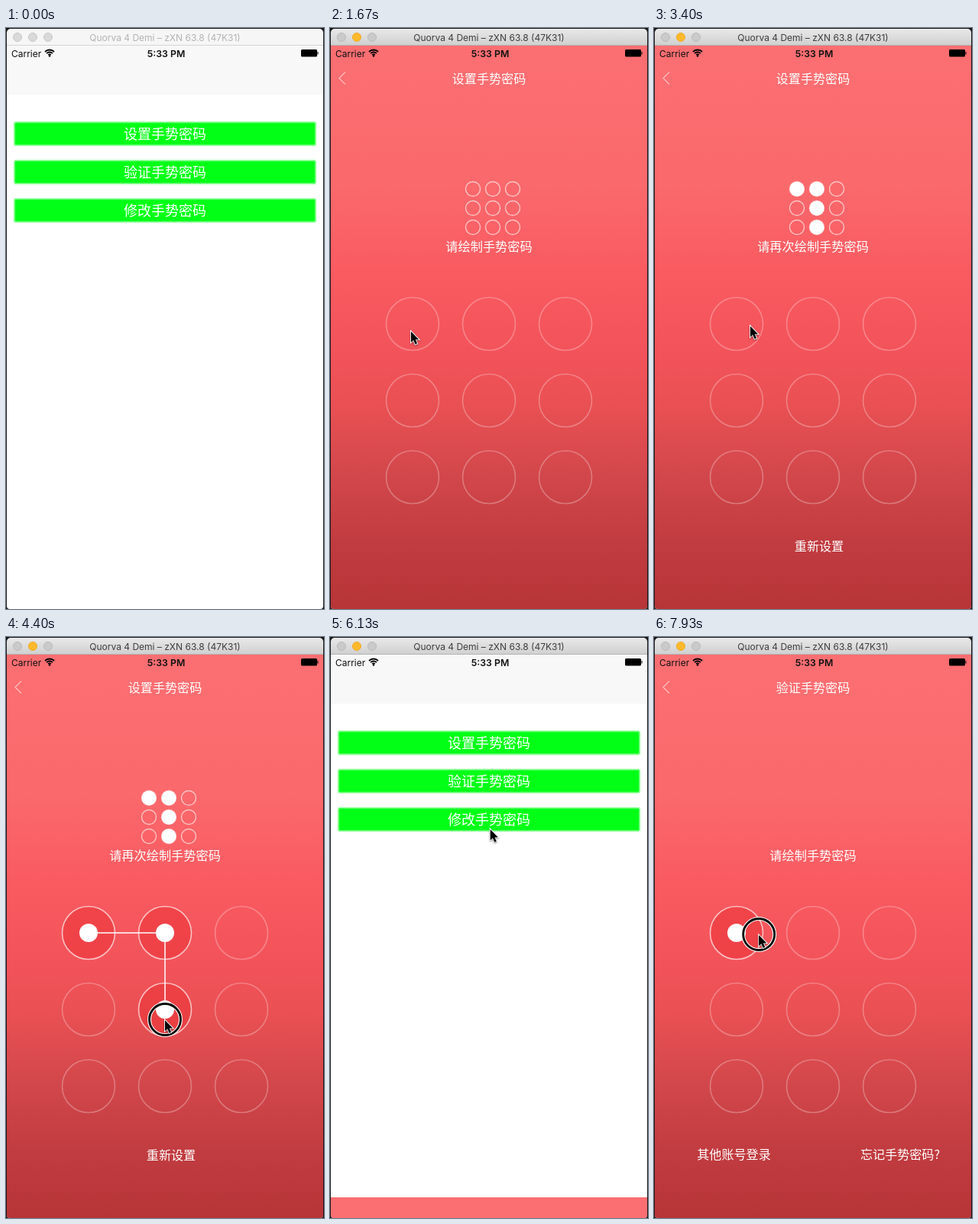
An HTML page with a canvas that plays this animation: 416 px wide and 758 px high, repeating every 8000 ms.

```html
<!DOCTYPE html>
<html lang="zh">
<head>
<meta charset="utf-8">
<style>
  html, body { margin: 0; overflow: hidden; background: #171717; }
  canvas { display: block; }
</style>
</head>
<body>
<canvas id="stage" width="416" height="758"></canvas>
<script>
const ctx = document.getElementById('stage').getContext('2d');
const LOOP = 8000, SCREEN_TOP = 22, SCREEN_HEIGHT = 736;
const SET_OPENS = 1037, SET_CLOSES = 5850, VERIFY_OPENS = 6706;
const CJK = '"Noto Sans CJK SC", "Noto Sans CJK", sans-serif';
const LATIN = 'Inter, Roboto, sans-serif';
const PATTERN = [0, 1, 4, 7];

// Pointer stops: time, x, y
const pointerStops = [
  [70, 300, 545], [650, 221, 145], [1130, 221, 145], [1670, 106, 395],
  [1800, 108, 390], [2150, 208, 388], [2500, 208, 486], [2850, 208, 588],
  [2950, 208, 588], [3400, 126, 388], [3560, 114, 387], [3950, 208, 388],
  [4350, 208, 486], [4750, 208, 588], [4900, 208, 588], [5670, 225, 363],
  [6450, 201, 185], [7000, 201, 185], [7750, 118, 389], [7870, 120, 389],
  [7930, 137, 388], [8000, 150, 388]
];
const drags = [
  { start: 1800, end: 2900, hits: [1800, 2030, 2390, 2740] },
  { start: 3560, end: 4850, hits: [3560, 3815, 4225, 4615] },
  { start: 7860, end: LOOP, hits: [7860] }
];
const clicks = [{ start: 850, end: 990 }, { start: 6560, end: 6690 }];

const during = (t, span) => t >= span.start && t < span.end;

// Critically damped spring: the share of the way still to go
function springLeft(ms) {
  const x = Math.max(0, ms) * 0.01826;
  return (1 + x) * Math.exp(-x);
}

function pointerAt(t) {
  const i = pointerStops.findIndex(stop => stop[0] > t);
  const [t0, x0, y0] = pointerStops[i - 1], [t1, x1, y1] = pointerStops[i];
  let k = (t - t0) / (t1 - t0);
  if (!drags.some(drag => during(t, drag))) k = k * k * (3 - 2 * k);
  return { x: x0 + (x1 - x0) * k, y: y0 + (y1 - y0) * k };
}

function text(value, x, y, size, color = '#fff', { family = CJK, weight = 400, align = 'center' } = {}) {
  ctx.font = `${weight} ${size}px ${family}`;
  ctx.textAlign = align;
  ctx.textBaseline = 'alphabetic';
  ctx.fillStyle = color;
  ctx.fillText(value, x, y);
}

function circle(x, y, r, { fill, stroke, width = 1 }) {
  ctx.beginPath();
  ctx.arc(x, y, r, 0, Math.PI * 2);
  if (fill) { ctx.fillStyle = fill; ctx.fill(); }
  if (stroke) { ctx.strokeStyle = stroke; ctx.lineWidth = width; ctx.stroke(); }
}

function polyline(points, color, width) {
  ctx.beginPath();
  points.forEach(([x, y]) => ctx.lineTo(x, y));
  ctx.strokeStyle = color;
  ctx.lineWidth = width;
  ctx.stroke();
}

function verticalGradient(top, bottom, stops) {
  const gradient = ctx.createLinearGradient(0, top, 0, bottom);
  stops.forEach(([at, color]) => gradient.addColorStop(at, color));
  return gradient;
}

function drawTitleBar(active) {
  ctx.fillStyle = active ? verticalGradient(1, 22, [[0, '#e9e9e9'], [1, '#d0d0d0']]) : '#f6f6f6';
  ctx.fillRect(0, 0, 416, 22);
  ctx.fillStyle = active ? '#b4b4b4' : '#d5d5d5';
  ctx.fillRect(0, 22, 416, 1);
  [15, 35, 55].forEach((x, i) => {
    const lit = active && i === 1;
    circle(x, 12, 5.5, {
      fill: lit ? '#fdb92c' : active ? '#cacaca' : '#d9d9d9',
      stroke: lit ? '#eeaa28' : active ? '#b8b8b8' : '#c6c6c6'
    });
  });
  text('Quorva 4 Demi – zXN 63.8 (47K31)', 208, 17, 12, active ? '#3d3d3d' : '#b3b3b3', { family: LATIN });
}

function drawStatusBar() {
  text('Carrier', 7, 38, 12, '#111', { family: LATIN, align: 'left' });
  text('5:33 PM', 209.5, 38, 12.3, '#111', { family: LATIN, weight: 600 });
  [2.5, 5.5, 8.5].forEach(r => {
    ctx.beginPath();
    ctx.arc(57, 37, r, -Math.PI * 0.75, -Math.PI * 0.25);
    ctx.strokeStyle = '#000';
    ctx.lineWidth = 1.8;
    ctx.stroke();
  });
  circle(57, 36.5, 1.2, { fill: '#000' });
  ctx.fillStyle = '#000';
  ctx.beginPath();
  ctx.roundRect(386, 28, 21, 9.5, 1.5);
  ctx.fill();
  ctx.fillRect(407.5, 31, 1, 3.5);
}

function drawMenu() {
  ctx.fillStyle = '#fff';
  ctx.fillRect(0, SCREEN_TOP, 416, SCREEN_HEIGHT);
  ctx.fillStyle = '#f8f8f8';
  ctx.fillRect(0, SCREEN_TOP, 416, 65);
  ['设置手势密码', '验证手势密码', '修改手势密码'].forEach((label, i) => {
    const y = 123 + i * 50;
    ctx.save();
    ctx.filter = 'blur(0.8px)';
    ctx.fillStyle = '#02ff16';
    ctx.fillRect(11, y, 394, 30);
    ctx.restore();
    text(label, 208, y + 21.5, 18);
  });
}

const nodeCenter = i => [108 + i % 3 * 100, 386 + Math.floor(i / 3) * 100];

function drawPad(t, offset) {
  const drag = drags.find(d => during(t, d));
  const chosen = drag ? PATTERN.filter((_, i) => t >= drag.hits[i]) : [];
  for (let i = 0; i < 9; i++) {
    const [x, y] = nodeCenter(i), on = chosen.includes(i);
    circle(x, y, 34.5, {
      fill: on ? 'rgba(236,48,52,.5)' : null,
      stroke: `rgba(255,255,255,${on ? 0.65 : 0.28})`, width: 1.6
    });
    if (on) circle(x, y, 12, { fill: '#fff' });
  }
  if (chosen.length) {
    const points = chosen.map(nodeCenter);
    const finger = pointerAt(t), [x, y] = points[points.length - 1];
    if (Math.hypot(finger.x - x, finger.y - offset - y) > 35) points.push([finger.x, finger.y - offset]);
    polyline(points, '#fff', 1.5);
  }
}

function drawPreview(filled) {
  for (let i = 0; i < 9; i++) {
    circle(187 + i % 3 * 26, 210 + Math.floor(i / 3) * 25, 9.5, {
      fill: filled && PATTERN.includes(i) ? '#fff' : null,
      stroke: 'rgba(255,255,255,.6)', width: 1.4
    });
  }
}

function drawSheet(t, offset, verifying) {
  ctx.save();
  ctx.beginPath();
  ctx.rect(0, SCREEN_TOP, 416, SCREEN_HEIGHT);
  ctx.clip();
  ctx.translate(0, offset);
  ctx.fillStyle = verticalGradient(SCREEN_TOP, 758, [
    [0, '#fb6f72'], [0.25, '#fa696c'], [0.4, '#f95b61'], [0.55, '#f2535a'],
    [0.64, '#e95053'], [0.75, '#d4484c'], [0.88, '#c13c40'], [1, '#b73437']
  ]);
  ctx.fillRect(0, SCREEN_TOP, 416, SCREEN_HEIGHT);
  polyline([[20, 57.5], [12, 65.5], [20, 73.5]], '#fff', 1);

  const drawnOnce = t >= drags[0].end, confirmed = t >= drags[1].end;
  text(verifying ? '验证手势密码' : '设置手势密码', 208, 72, 16.1);
  if (verifying) {
    text('请绘制手势密码', 208, 291, 16.2);
    text('其他账号登录', 104.5, 680.5, 16.1);
    text('忘记手势密码?', 322, 680.5, 16.1);
  } else {
    drawPreview(drawnOnce);
    text(confirmed ? '设置成功' : drawnOnce ? '请再次绘制手势密码' : '请绘制手势密码', 208, 291, 16.2);
    if (drawnOnce) text('重新设置', 216, 682, 16.1);
  }
  drawPad(t, offset);
  ctx.restore();
}

function drawPointer(t) {
  const { x, y } = pointerAt(t);
  if ([...drags, ...clicks].some(press => during(t, press))) {
    circle(x, y, 20.5, { stroke: '#fff', width: 5 });
    circle(x, y, 20.5, { stroke: '#000', width: 2.8 });
  }
  ctx.save();
  ctx.translate(x, y + 1);
  ctx.shadowColor = 'rgba(0,0,0,.35)';
  ctx.shadowBlur = 2;
  ctx.shadowOffsetY = 1;
  const arrow = new Path2D('M0 0V14L3.2 11L5.6 16.6L8 15.6L5.6 10.2H10Z');
  ctx.strokeStyle = '#fff';
  ctx.lineWidth = 2;
  ctx.stroke(arrow);
  ctx.fillStyle = '#000';
  ctx.fill(arrow);
  ctx.restore();
}

function draw(t) {
  ctx.fillStyle = '#171717';
  ctx.fillRect(0, 0, 416, 758);
  ctx.save();
  ctx.beginPath();
  ctx.roundRect(1, 1, 414, 757, [5, 5, 4, 4]);
  ctx.clip();
  drawMenu();

  const verifying = t >= VERIFY_OPENS;
  let left = springLeft(t - (verifying ? VERIFY_OPENS : SET_OPENS));
  if (!verifying && t >= SET_CLOSES) left = 1 - springLeft(t - SET_CLOSES);
  if (left < 0.999) drawSheet(t, Math.round(left * SCREEN_HEIGHT), verifying);

  drawStatusBar();
  drawTitleBar(t >= 930);
  ctx.restore();
  if (t >= 70) drawPointer(t);
}

const startTime = performance.now();
function tick() {
  draw((performance.now() - startTime) % LOOP);
  requestAnimationFrame(tick);
}
tick();
</script>
</body>
</html>
```
